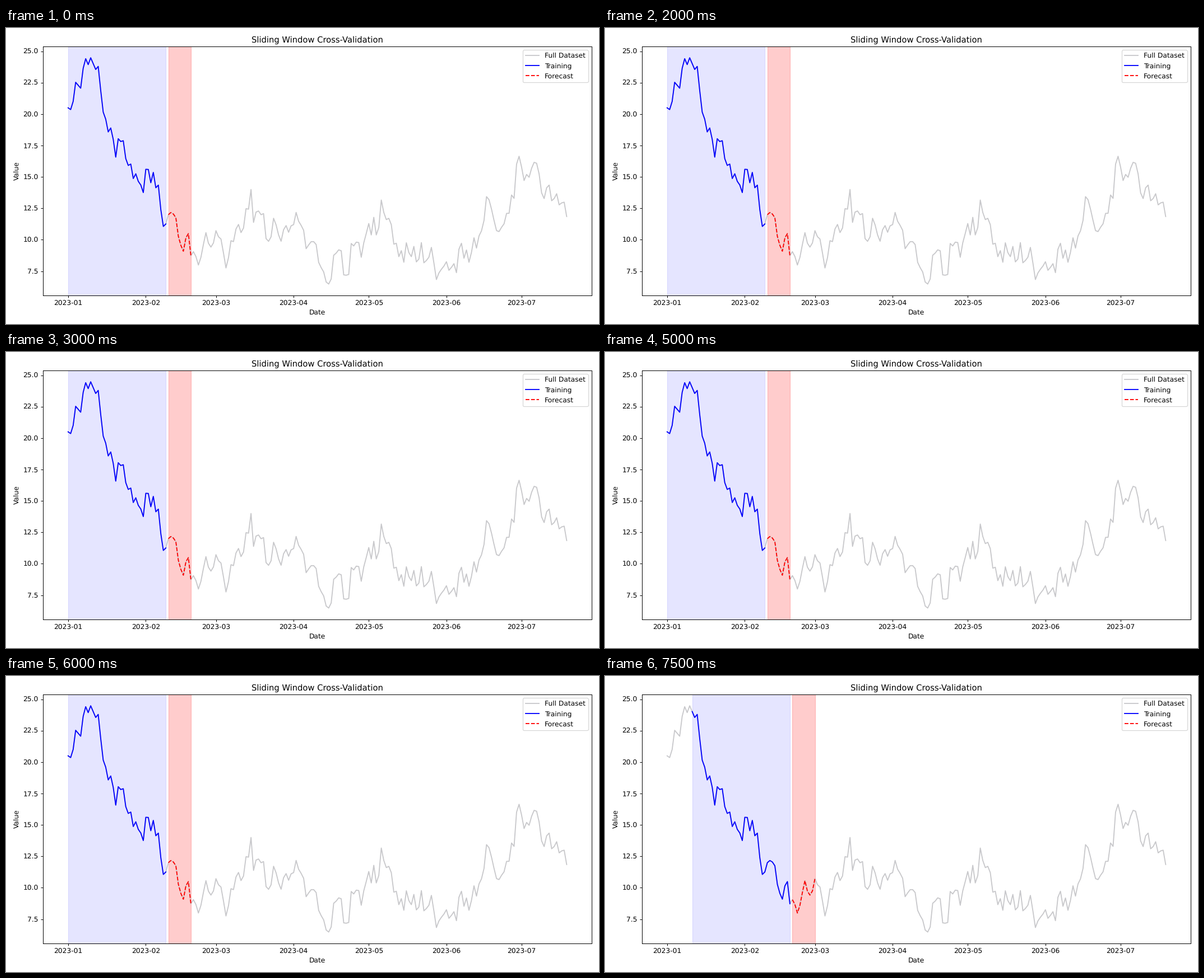
Recreate the animation shown at these times as a matplotlib script. Size 1058 by 529 pixels, loop 8000 ms.

```python
import numpy as np
import matplotlib.pyplot as plt
from matplotlib.animation import FuncAnimation

WIDTH, HEIGHT = 1058, 529
FRAMES, INTERVAL = 16, 500
SLIDE_FRAME = 15            # the window moves on for the last half second
TRAIN, TEST, STEP = 40, 10, 10

plt.rcParams.update({"font.family": "DejaVu Sans", "text.hinting": "no_hinting"})

np.random.seed(42)
dates = np.datetime64("2023-01-01") + np.arange(200)
values = 20 + np.cumsum(np.random.randn(dates.size))

fig, ax = plt.subplots(figsize=(12, 6), dpi=WIDTH / 12)
fig.subplots_adjust(left=66.4 / WIDTH, right=1044.8 / WIDTH,
                    bottom=1 - 477.8 / HEIGHT, top=1 - 33 / HEIGHT)

ax.plot(dates, values, color="#c8c8cb", label="Full Dataset")
train_line, = ax.plot(dates[:TRAIN], values[:TRAIN], color="blue", label="Training")
test_line, = ax.plot(dates[TRAIN:TRAIN + TEST], values[TRAIN:TRAIN + TEST],
                     color="red", linestyle="--", label="Forecast")
ax.set_xlim(ax.get_xlim())
ax.set_ylim(ax.get_ylim())
ax.set_title("Sliding Window Cross-Validation")
ax.set_xlabel("Date")
ax.set_ylabel("Value")
ax.legend(loc="upper right", labelspacing=0.54)

spans = []


def show_part(line, part, color, alpha):
    line.set_data(dates[part], values[part])
    spans.append(ax.axvspan(dates[part][0], dates[part][-1], color=color, alpha=alpha))


def update(frame):
    while spans:
        spans.pop().remove()
    start = STEP if frame >= SLIDE_FRAME else 0
    split = start + TRAIN
    show_part(train_line, slice(start, split), "blue", 0.1)
    show_part(test_line, slice(split, split + TEST), "red", 0.2)
    return [train_line, test_line, *spans]


anim = FuncAnimation(fig, update, frames=FRAMES, interval=INTERVAL,
                     init_func=lambda: update(0), repeat=True, repeat_delay=0)
plt.show()
```
